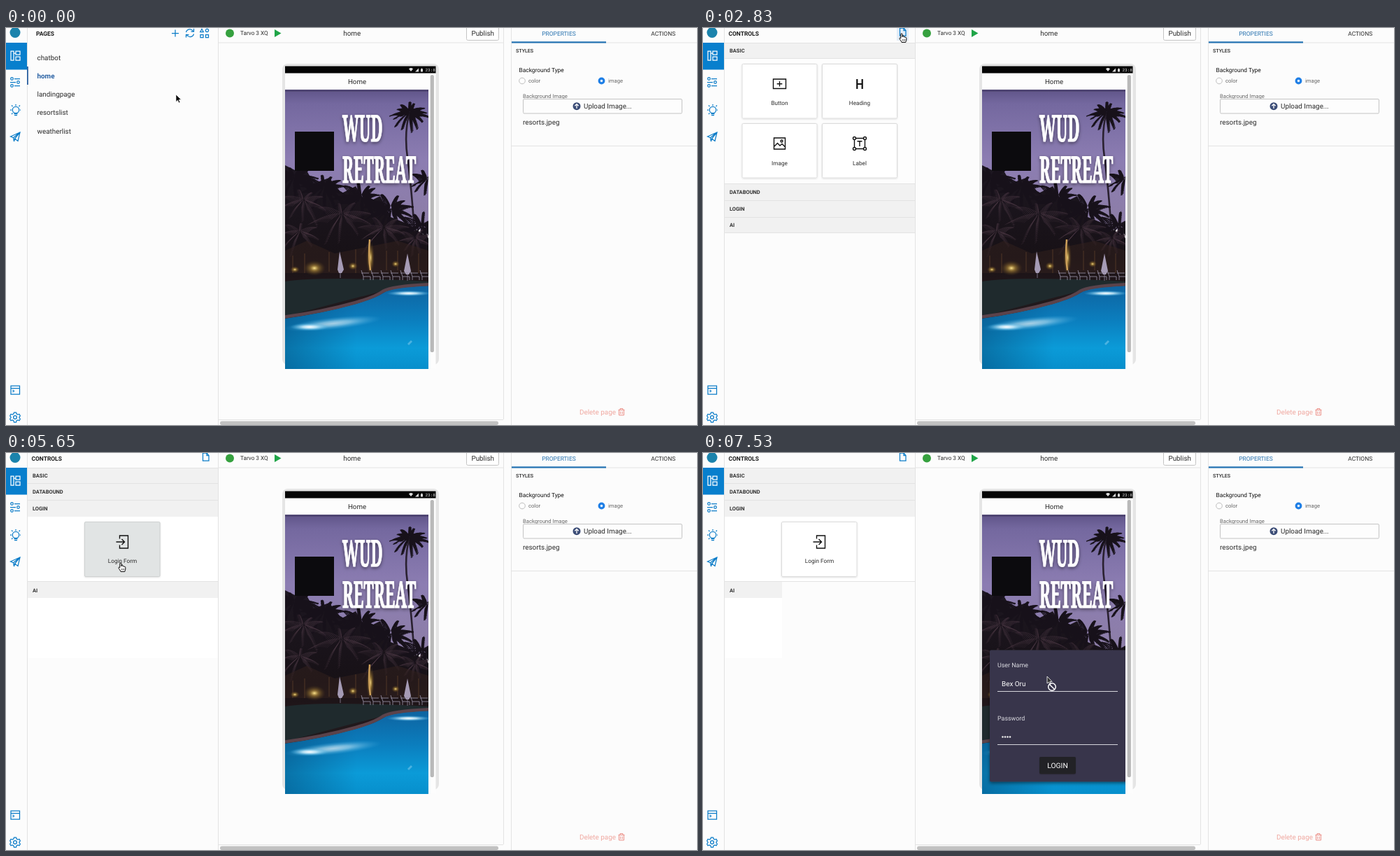
Write an HTML page that moves like this. It is 988 px wide and 567 px high and loops after 8 s.

```html
<!DOCTYPE html>
<html lang="en">
<head>
<meta charset="utf-8">
<title>App builder</title>
<style>
html, body { margin: 0; width: 100%; height: 100%; overflow: hidden; background: #fcfcfc; }
svg.stage { display: block; width: 100vw; height: 100vh; }
text { font-family: Roboto, "Open Sans", sans-serif; font-size: 9.9px; fill: #2b2b2b; text-rendering: geometricPrecision; white-space: pre; }
.mid { text-anchor: middle; }
.head { font-size: 8.45px; font-weight: 700; fill: #1c1c1c; }
.band text { font-size: 7.5px; font-weight: 700; fill: #333; }
.band rect { fill: #f1f1f1; }
.tab { font-size: 8.45px; }
.small { font-size: 7.65px; fill: #666; }
.cap { font-size: 8.2px; text-anchor: middle; }
.rule { stroke: #e3e3e3; fill: none; }
.blue { stroke: #0b7cc8; fill: none; stroke-width: 1.25; }
.ink { stroke: #111; fill: none; stroke-width: 1.4; }
.card { fill: #fff; stroke: #dcdcdc; }
.over { fill: #e1e4e4; stroke: #cfd2d2; }
.wordmark { font-family: "Noto Serif", serif; font-weight: 700; font-size: 22.3px; fill: #fff; stroke: #fff; stroke-width: .5; }
.form text { fill: #dcdce2; font-size: 8.9px; }
</style>
</head>
<body>
<svg class="stage" viewBox="0 0 988 567" preserveAspectRatio="none">
<defs>
  <linearGradient id="sky" x1="0" y1="0" x2="0" y2="1">
    <stop offset="0" stop-color="#5f5488"/><stop offset=".1" stop-color="#74689f"/>
    <stop offset=".5" stop-color="#8c7db2"/><stop offset="1" stop-color="#8d7ea6"/>
  </linearGradient>
  <linearGradient id="grove" x1="0" y1="0" x2="0" y2="1">
    <stop offset="0" stop-color="#1d1721"/><stop offset=".45" stop-color="#171116"/>
    <stop offset=".6" stop-color="#22171a"/><stop offset="1" stop-color="#1b2025"/>
  </linearGradient>
  <linearGradient id="water" x1="0" y1="0" x2="0" y2="1">
    <stop offset="0" stop-color="#0e63a0"/><stop offset=".4" stop-color="#0b7dbd"/>
    <stop offset=".75" stop-color="#0b9bd8"/><stop offset="1" stop-color="#078fcc"/>
  </linearGradient>
  <linearGradient id="depth">
    <stop offset="0" stop-color="#064a78" stop-opacity=".5"/><stop offset=".5" stop-color="#064a78" stop-opacity="0"/>
  </linearGradient>
  <radialGradient id="lamp"><stop offset="0" stop-color="#ffe58c"/><stop offset=".35" stop-color="#a88438" stop-opacity=".7"/><stop offset="1" stop-color="#4a3318" stop-opacity="0"/></radialGradient>
  <radialGradient id="shine"><stop offset="0" stop-color="#fff"/><stop offset=".35" stop-color="#c9ecfb" stop-opacity=".85"/><stop offset="1" stop-color="#3fb0e6" stop-opacity="0"/></radialGradient>
  <clipPath id="screen"><path d="M399 88H604V487H399Z"/></clipPath>
  <filter id="soft" x="-20%" y="-20%" width="140%" height="140%"><feDropShadow dx="0" dy=".7" stdDeviation=".8" flood-opacity=".14"/></filter>
  <filter id="deep" x="-20%" y="-20%" width="140%" height="150%"><feDropShadow dx="0" dy="2" stdDeviation="2.5" flood-opacity=".5"/></filter>

  <g id="door" class="ink"><path d="M-4-4.5V-9H8V9H-4V4.5M-9 0H3M-1-4 3 0-1 4"/></g>
  <g id="login"><use href="#door" x="53.5" y="29"/><text class="cap" x="53.5" y="59">Login Form</text></g>
  <path id="arrow" d="M0 0V10.5L2.5 8.2 4.2 12 6 11.2 4.3 7.5H7.6Z" fill="#000" stroke="#fff" stroke-width=".7"/>
  <g id="hand"><path d="M-1.2 5.8V1C-1.2-.5 1-.5 1 1V4.6C2 0 3 4 3.1 5 4 4.2 5 4.6 5 5.5 6 5 6.8 5.4 6.8 6.4V9C6.8 10.4 6 11 5.8 12.4H0C-.4 10.8-2.4 8.8-3 7.2-3.2 6-2 5.6-1.2 6.8Z" fill="#fff" stroke="#000"/><path d="M1.2 8V10.5M3 8V10.5M4.7 8V10.5" stroke="#000" stroke-width=".6"/></g>
  <g id="copy"><use href="#arrow"/><circle cx="6" cy="15" r="6.5" fill="#32a321" stroke="#e4f3e0" stroke-width=".6"/><path d="M6 11.5V18.5M2.5 15H9.5" stroke="#fff" stroke-width="1.7"/></g>
  <g id="deny"><path d="M0 0V10L2.5 8.2 4 11.5 5.5 10.8 4 7.5H7.2Z" fill="#333" stroke="#fff" stroke-width=".8"/><g fill="none" stroke="#fff" stroke-width="1.5"><circle cx="7" cy="15" r="5.3"/><path d="M3.2 11.3 10.8 18.7"/></g></g>
</defs>

<rect width="988" height="567" fill="#fcfcfc"/>

<!-- navigation rail -->
<circle cx="13" cy="6.5" r="7.5" fill="#1b83ac"/>
<rect y="21" width="30" height="38.5" fill="#087fcd"/>
<g class="blue">
  <path stroke="#fff" d="M7 33H11V46H7ZM14 33H20V38H14ZM14 41H20V46H14ZM11 36H14"/>
  <path d="M12 72.5H20M6 77.5H14M12 82.5H20"/><circle cx="8.5" cy="72.5" r="1.8"/><circle cx="17.5" cy="77.5" r="1.8"/><circle cx="8.5" cy="82.5" r="1.8"/>
  <circle cx="14" cy="117" r="4.7"/><path d="M11.5 122.5H16.5M12 124.5H16M6 117H8M20 117H21M8 110.5 9.5 112M20 110.5 18.5 112M14 109V111M8 123 9.5 121.5"/>
  <path d="M6.5 155 20 149 17 161.5 12.500 158 11.5 162 10.5 156.7ZM10.5 156.7 20 149 12.5 158"/>
  <path d="M7 511H19.5V523H7ZM7 514.5H19.5M9.5 517 11.5 518.5 9.5 520"/>
  <circle cx="13" cy="556" r="2.4"/><path d="M11.5 549H14.5L15 551 17 552 19 551.5 20.3 554 18.8 556 20.3 558.5 19 560.7 17 560 15 561 14.5 563H11.5L11 561 9 560 7 560.7 5.7 558.5 7.2 556 5.7 554 7 551.5 9 552 11 551Z"/>
</g>
<path class="rule" d="M30.5 0V567M303.5 0V567"/>

<!-- pages -->
<g data-on="0-2830">
  <text class="head" x="43" y="10.7">PAGES</text>
  <g class="blue">
    <path d="M242 2.5V12.5M237 7.5H247"/>
    <path d="M257.5 6A5.5 5.5 0 0 1 267.5 4.5M268.5 1V5H264.5M268.5 8.5A5.5 5.5 0 0 1 258.5 10M257.5 13.5V9.5H261.5"/>
    <path d="M280 1.5 282.3 5.5H277.7ZM278 9.5H282V13.5H278ZM285.5 9.5H289.5V13.5H285.5Z"/><circle cx="287.5" cy="3.5" r="2.1"/>
  </g>
  <rect data-on="1050-1820" x="31" y="55" width="272" height="26" fill="#f2f6fa"/>
  <rect x="30" y="55" width="1.8" height="26" fill="#2a5f9e"/>
  <text x="44.5" y="45.5">chatbot</text>
  <text x="44.5" y="71.7" font-weight="700" style="fill:#2a62a4">home</text>
  <text x="44.5" y="98">landingpage</text>
  <text x="44.5" y="124.3">resortslist</text>
  <text x="44.5" y="150.5">weatherlist</text>
</g>

<!-- controls -->
<g data-on="2830-8000">
  <rect data-on="2830-3070" x="277" y="0" width="17" height="18" fill="#e3edf7"/>
  <text class="head" x="36.5" y="10.7">CONTROLS</text>
  <path class="blue" d="M281.5 0H287L290 3.5V11H281.5ZM287 0V3.5H290"/>
  <g class="band"><rect x="31" y="21.5" width="272" height="22"/><text x="38" y="34.9">BASIC</text></g>
  <path class="rule" d="M31 21.5H303M31 43.5H303"/>
</g>
<g data-on="2830-4710">
  <rect x="31" y="44" width="272" height="178" fill="#fdfdfd"/>
  <g filter="url(#soft)">
    <rect class="card" x="56" y="51.5" width="107" height="77.5" rx="1.5"/>
    <rect class="card" x="170.5" y="51.5" width="107" height="77.5" rx="1.5"/>
    <rect class="card" x="56" y="136.5" width="107" height="77.5" rx="1.5"/>
    <rect class="card" x="170.5" y="136.5" width="107" height="77.5" rx="1.5"/>
  </g>
  <rect class="over" data-on="3330-3480" x="56" y="51.5" width="107" height="77.5" rx="1.5"/>
  <rect class="over" data-on="3480-4210" x="56" y="136.5" width="107" height="77.5" rx="1.5"/>
  <g class="ink">
    <path d="M100.5 73H118.5V86.5H100.5ZM109.5 76V83.5M105.7 79.7H113.3"/>
    <path stroke-width="2.2" d="M220.3 73V87M227.7 73V87M220.3 80H227.7"/>
    <path d="M101.5 157H117.5V173H101.5ZM102 169 106.5 164.5 110 168 113 165.5 117 169.5"/><circle cx="112.5" cy="161.5" r="1.5"/>
    <path d="M218 157.5H230M218 172.5H230M216.5 159V171M231.5 159V171M220.5 161.7H227.5M224 161.7V169"/>
    <circle cx="216.5" cy="157.5" r="2"/><circle cx="231.5" cy="157.5" r="2"/><circle cx="216.5" cy="172.5" r="2"/><circle cx="231.5" cy="172.5" r="2"/>
  </g>
  <text class="cap" x="109.5" y="110">Button</text><text class="cap" x="224" y="110">Heading</text>
  <text class="cap" x="109.5" y="195.5">Image</text><text class="cap" x="224" y="195.5">Label</text>
  <g class="band"><rect x="31" y="222.5" width="272" height="70.5"/>
    <text x="38" y="237">DATABOUND</text><text x="38" y="260.7">LOGIN</text><text x="38" y="284.3">AI</text></g>
  <path class="rule" d="M31 222.5H303M31 246.5H303M31 270.5H303M31 292.5H303"/>
</g>
<g data-on="4710-8000">
  <rect x="31" y="91" width="272" height="202" fill="#fff"/>
  <rect data-on="6270-7530" x="205" y="207" width="98" height="87" fill="#fcfcfc"/>
  <g class="band"><rect x="31" y="44" width="272" height="47"/><rect x="31" y="184" width="272" height="23"/>
    <text x="38" y="58.3">DATABOUND</text><text x="38" y="82">LOGIN</text><text x="38" y="198.5">AI</text></g>
  <rect data-on="7530-8000" x="113" y="184" width="190" height="110" fill="#fcfcfc"/>
  <path class="rule" d="M31 43.5H303M31 67.5H303M31 183.5H303"/>
  <rect class="card" filter="url(#soft)" x="112.5" y="98.5" width="107.5" height="78" rx="1.5"/>
  <rect class="over" data-on="5420-7530" x="112.5" y="98.5" width="107.5" height="78" rx="1.5"/>
  <use href="#login" x="113" y="98"/>
</g>

<!-- canvas -->
<path class="rule" d="M304 21H711M711.5 0V559M304 559.5H711"/>
<circle cx="320" cy="7.5" r="6" fill="#36a13f"/>
<text x="335" y="10.3" style="font-size:8.2px">Tarvo 3 XQ</text>
<path d="M384 2 393.5 7.5 384 13Z" fill="#1fa548"/>
<text class="mid" x="494.7" y="11">home</text>
<rect x="658.5" y="-5" width="46" height="22.5" rx="2" fill="#fff" stroke="#c4c4c4"/>
<text class="mid" x="681.7" y="11.2">Publish</text>
<rect x="306" y="561.5" width="398" height="5.5" rx="2.75" fill="#c1c1c1"/>

<rect x="395" y="51" width="224" height="430" rx="8" fill="#e5e5e5"/>
<rect x="399" y="64.5" width="215.500" height="422" fill="#fdfdfd"/>
<rect x="399" y="54.500" width="215.500" height="10" fill="#050505"/>
<g fill="#ddd"><path d="M576 58.5Q579 55.7 582 58.5L579 62ZM585 62.5H590V57.5ZM593 58.5H596V62.5H593ZM594 57.5H595V58.5H594Z"/></g>
<text x="599.5" y="62.3" style="font:6px 'Liberation Mono',monospace;fill:#e5e5e5">23:8</text>
<text class="mid" x="502" y="79.8" style="font-size:9.7px">Home</text>
<rect x="606.7" y="67" width="5.2" height="396" rx="2.6" fill="#b9b9b9"/>

<g clip-path="url(#screen)">
  <rect x="399" y="88" width="205" height="200" fill="url(#sky)"/>
  <path d="M399 196 415 204 428 200 440 222 462 214 480 236 500 226 515 250 535 240 550 270 575 280 604 300V487H399Z" fill="url(#grove)"/>
  <path d="M577 120Q569 150 574 185T584 290" fill="none" stroke="#2a2130" stroke-width="2.6"/>
  <path id="fronds" fill="none" stroke="#17111a" stroke-width="1.3"/>
  <path id="lightFronds" fill="none" stroke="#54434c" stroke-width=".6" opacity=".4"/>
  <path d="M399 318 430 304 470 322 520 312 560 304 604 318V350H399Z" fill="#35231f" opacity=".5"/>
  <path d="M410 325V350M427 322V350M462 320V348M500 316V350M544 318V346M560 318V346M590 322V350" stroke="#7a5532" opacity=".5"/>
  <g fill="url(#lamp)"><ellipse cx="441" cy="343" rx="16" ry="11"/><ellipse cx="413" cy="345" rx="7" ry="5"/><ellipse cx="521" cy="328" rx="6" ry="25"/><ellipse cx="496" cy="340" rx="7" ry="6"/><ellipse cx="557" cy="337" rx="6" ry="5"/></g>
  <path d="M520 302Q518 325 521 346" fill="none" stroke="#cda05a" stroke-width="2.5"/>
  <path d="M399 362Q450 354 604 362V370L545 374 399 412Z" fill="#1f2a2d"/>
  <path d="M477 319 483 345 480 350H476L474 345ZM574 322 579 347 576 352H572L569 347Z" fill="#a59bb5"/>
  <path d="M478 350V357M574 352V361" stroke="#776f82"/>
  <path id="chairs" fill="none" stroke="#8f889b" stroke-width=".9"/>
  <path d="M399 415Q450 408 500 394 528 386 540 378 552 370 604 368V487H399Z" fill="url(#water)"/>
  <path d="M399 415Q450 408 500 394 528 386 540 378 552 370 604 368V487H399Z" fill="url(#depth)"/>
  <path d="M395 413Q450 406 500 392 528 384 539 376 552 368 608 366" fill="none" stroke="#5b434b" stroke-width="4.500"/>
  <ellipse cx="468" cy="422" rx="70" ry="9" fill="url(#shine)" opacity=".65" transform="rotate(-6 468 422)"/>
  <ellipse cx="434" cy="427" rx="28" ry="5.500" fill="url(#shine)"/>
  <ellipse cx="576" cy="379" rx="32" ry="4" fill="url(#shine)"/>
  <path d="M574 451 579 446 581 448 576 453Z" fill="#6ec2e8" opacity=".65"/>
  <rect x="413" y="148" width="56" height="56" fill="#0c0b0e"/>
  <g filter="url(#deep)">
    <g transform="translate(481 162) scale(1 2.35)"><text class="wordmark">WUD</text></g>
    <g transform="translate(481 221) scale(1 2.35)"><text class="wordmark">RETREAT</text></g>
  </g>
  <path d="M399 88H604V91H399Z" fill="#352e50" opacity=".4"/>

  <g class="form" data-on="7530-8000">
    <rect x="410" y="281.5" width="198" height="188" rx="2" fill="#37364b" filter="url(#deep)"/>
    <text x="421" y="305.7">User Name</text>
    <text x="427" y="333" style="font-size:9.9px;fill:#fff">Bex Oru</text>
    <text x="421" y="382">Password</text>
    <g fill="#eee"><circle cx="428.5" cy="405.5" r="1.3"/><circle cx="432" cy="405.5" r="1.3"/><circle cx="435.5" cy="405.5" r="1.3"/><circle cx="439" cy="405.5" r="1.3"/></g>
    <path d="M421 340.5H593M421 416.5H593" stroke="#d5d5dc"/>
    <rect x="481" y="434" width="52" height="24.5" rx="2" fill="#222126" filter="url(#soft)"/>
    <text class="mid" x="507" y="449.8" style="font-size:10.3px;fill:#fff">LOGIN</text>
  </g>
</g>

<!-- properties -->
<path class="rule" d="M722.5 0V567M723 21H988M723 168.5H988"/>
<rect x="723" y="19.3" width="135" height="2.2" fill="#2372b3"/>
<text class="tab mid" x="790.5" y="10.5" style="fill:#2470ae">PROPERTIES</text>
<text class="tab mid" x="939.7" y="10.5">ACTIONS</text>
<text x="729" y="34.8" style="font-size:7.1px;font-weight:500">STYLES</text>
<text x="733.5" y="63.2" style="font-size:8.4px;fill:#111">Background Type</text>
<circle cx="738" cy="75.5" r="4.3" fill="#fff" stroke="#bcbcbc"/>
<circle cx="851.5" cy="75.5" r="4.9" fill="#1f7fe6"/><circle cx="851.5" cy="75.5" r="1.7" fill="#fff"/>
<text class="small" x="747" y="78.3">color</text><text class="small" x="861" y="78.3">image</text>
<text class="small" x="739" y="99.5">Background Image</text>
<rect x="739.5" y="101.5" width="227" height="20.5" rx="1.5" fill="#fdfdfd" stroke="#c4c4c4"/>
<circle cx="816" cy="111.7" r="5.5" fill="#3c4d77"/><path d="M816 115V109M813.3 111.3 816 108.6 818.7 111.3" fill="none" stroke="#fff" stroke-width="1.3"/>
<text x="826" y="115.2">Upload Image...</text>
<text x="739" y="138">resorts.jpeg</text>
<text x="820" y="552" style="fill:#f0a8a0">Delete page</text>
<path d="M875.5 545.5H884.5M878 545V543.5H882V545M876.5 546V553H883.5V546M878.7 547.5V551.5M881.3 547.5V551.5" fill="none" stroke="#ec928a"/>

<g id="ghost"><rect width="107" height="78.5" fill="#e1e4e4" stroke="#c9cccc" stroke-width=".7" opacity=".93"/><use href="#login" opacity=".85"/></g>
<use id="cursor" href="#arrow"/>
</svg>

<script>
const LOOP = 8000;
const $ = id => document.getElementById(id);

// Palm crowns: drooping ribs with leaflets on both sides.
let seed = 7;
const rand = () => (seed = seed * 16807 % 2147483647) / 2147483647;
function crown(cx, cy, count, length) {
  let d = '';
  for (let i = 0; i < count; i++) {
    const a = (i + rand() * .6) / count * Math.PI * 2;
    const r = length * (.75 + rand() * .4);
    const at = s => [cx + Math.cos(a) * r * s, cy + Math.sin(a) * r * s * .8 + r * .3 * s * s];
    for (let s = .08; s < 1; s += .07) {
      const [x, y] = at(s);
      const [nx, ny] = at(s + .07);
      const leaf = r * .3 * (1.1 - s);
      d += `M${x} ${y}L${nx} ${ny}l${Math.cos(a) * leaf - 2} ${leaf}M${x} ${y}l${Math.cos(a) * leaf + 2} ${leaf * .6}`;
    }
  }
  return d;
}
$('fronds').setAttribute('d', [
  [577, 119, 14, 24], [412, 212, 13, 30], [455, 226, 13, 34],
  [508, 240, 13, 36], [550, 256, 13, 34], [594, 282, 12, 36], [602, 215, 9, 22]
].map(c => crown(...c)).join(''));
$('lightFronds').setAttribute('d', [
  [425, 245, 9, 32], [480, 265, 9, 38], [540, 285, 9, 35], [420, 290, 8, 28], [585, 300, 8, 25]
].map(c => crown(...c)).join(''));

let chairs = '';
for (let x = 508; x < 604; x += 14) chairs += `M${x} 346l3 9h10v5m-10-5v5m-3-10h11`;
$('chairs').setAttribute('d', chairs);

// Pointer poses: start time, shape, tip.
const poses = [
  [0, 'arrow', 243, 95], [630, 'hand', 249, 56], [810, 'hand', 225, 34], [930, 'hand', 178, 48],
  [1050, 'hand', 149, 67], [1200, 'hand', 147, 68], [1700, 'hand', 170, 58], [1820, 'hand', 210, 38],
  [1940, 'arrow', 236, 22], [2080, 'hand', 241, 16], [2230, 'hand', 265, 12], [2380, 'hand', 281, 8],
  [2530, 'hand', 284, 8], [3070, 'arrow', 225, 45], [3180, 'hand', 150, 105], [3330, 'hand', 135, 153],
  [3480, 'hand', 112, 176], [3590, 'hand', 103, 182], [3950, 'hand', 90, 212], [4060, 'hand', 76, 236],
  [4210, 'hand', 68, 248], [4330, 'hand', 62, 252], [4470, 'hand', 60, 255], [4710, 'arrow', 60, 255],
  [5190, 'arrow', 85, 235], [5310, 'arrow', 115, 205], [5420, 'hand', 142, 172], [5540, 'hand', 160, 160],
  [5650, 'hand', 164, 157], [6120, 'copy', 228, 211], [6270, 'copy', 272, 260], [6390, 'copy', 330, 325],
  [6500, 'copy', 415, 338], [6620, 'copy', 505, 347], [6740, 'copy', 499, 342], [6850, 'copy', 486, 335],
  [6970, 'copy', 490, 328], [7120, 'copy', 508, 310], [7240, 'copy', 509, 313], [7380, 'copy', 491, 325],
  [7530, 'deny', 492, 319]
];
const timed = [...document.querySelectorAll('[data-on]')].map(el => [el, ...el.dataset.on.split('-').map(Number)]);

function draw() {
  const t = performance.now() % LOOP;
  for (const [el, from, to] of timed) el.style.display = t >= from && t < to ? '' : 'none';
  const [, shape, x, y] = poses.filter(p => p[0] <= t).pop();
  $('cursor').setAttribute('href', '#' + shape);
  $('cursor').setAttribute('transform', `translate(${x} ${y})`);
  $('ghost').style.display = shape === 'copy' ? '' : 'none';
  $('ghost').setAttribute('transform', `translate(${x - 57} ${y - 53})`);
  requestAnimationFrame(draw);
}
draw();
</script>
</body>
</html>
```
